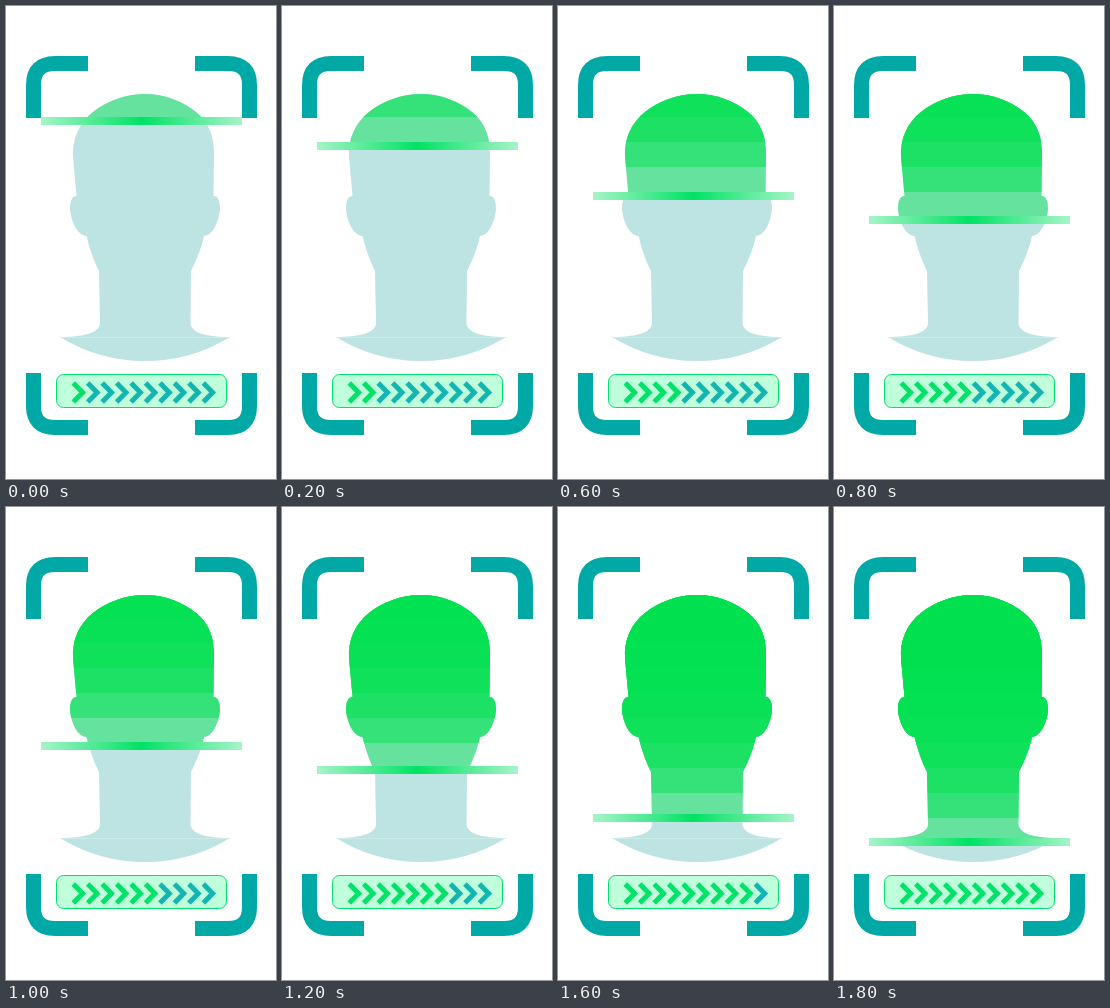
Animation, 270 px wide and 473 px high, one loop 2 s. Source, as an HTML page:

```html
<!DOCTYPE html>
<html lang="en">
<head>
<meta charset="utf-8">
<title>Face scan</title>
<style>
  html, body { margin: 0; width: 100%; height: 100%; overflow: hidden; background: #fff; }
  svg { display: block; width: 100vw; height: 100vh; }
  .corners { fill: none; stroke: #00a9a6; stroke-width: 15; }
  .layer { fill: #00df50; fill-opacity: .47; }
  .arrow { fill: none; stroke: #14b5b0; stroke-width: 5; }
  .arrow.on { stroke: #00e268; }
</style>
</head>
<body>
<svg viewBox="0 0 270 473">
  <defs>
    <path id="head" d="M139 88C119 88 101 95 87 106C73 117 66 133 67 151L70.5 190C65.500 190 64 196 64 203C65 216 72 230 80.500 230C84 244 88 255 93 265L94 317C94 326 80 331 54 331Q93 355 139 355T224 331C198 331 185 326 184.500 317L185 265C190 255 195 244 198 230C206 230 213 216 214 203C214 196 212.500 190 207.500 190L208 148C208 132 204 117 190 106C176 95 159 88 139 88Z"/>
    <clipPath id="clip"><use href="#head"/></clipPath>
    <linearGradient id="beam">
      <stop offset="0" stop-color="#a6f4c8"/>
      <stop offset=".5" stop-color="#00e264"/>
      <stop offset="1" stop-color="#a6f4c8"/>
    </linearGradient>
  </defs>

  <path class="corners" d="M82 57.500H49Q27.500 57.500 27.500 79V112M189 57.500H222Q243.500 57.500 243.500 79V112M82 421.500H49Q27.500 421.500 27.500 400V367M189 421.500H222Q243.500 421.500 243.500 400V367"/>

  <use href="#head" fill="#bde4e3"/>
  <path d="M54 331.500H224" stroke="#d3eeec" stroke-width=".7"/>
  <g id="layers" clip-path="url(#clip)"></g>
  <rect id="bar" x="35" y="111" width="201" height="8" fill="url(#beam)"/>

  <rect x="50.500" y="368.500" width="170" height="33" rx="7" fill="#c0ffdc" stroke="#00e06c"/>
  <g id="arrows"></g>
</svg>
<script>
  const STEP = 200, COUNT = 10;
  const barY = [111, 136, 161, 186, 210, 235, 259, 283, 307, 331];
  const byId = id => document.getElementById(id);

  function add(parent, tag, attrs) {
    const el = document.createElementNS('http://www.w3.org/2000/svg', tag);
    for (const key in attrs) el.setAttribute(key, attrs[key]);
    return byId(parent).appendChild(el);
  }

  const layers = [], arrows = [];
  for (let i = 0; i < COUNT; i++) {
    const bottom = Math.round(111 + 25.05 * i);
    layers.push(add('layers', 'rect', { class: 'layer', x: 35, y: 80, width: 201, height: bottom - 80 }));
    arrows.push(add('arrows', 'path', { class: 'arrow', d: `M${67.3 + 14.45 * i} 377l9.300 9.500l-9.300 9.500` }));
  }

  const start = performance.now();
  let shown = -1;

  function draw(now) {
    const step = Math.floor(Math.max(0, now - start) / STEP) % COUNT;
    if (step !== shown) {
      shown = step;
      byId('bar').setAttribute('y', barY[step]);
      layers.forEach((el, i) => el.style.display = i <= step ? '' : 'none');
      arrows.forEach((el, i) => el.classList.toggle('on', i <= step));
    }
    requestAnimationFrame(draw);
  }
  draw(start);
</script>
</body>
</html>
```
